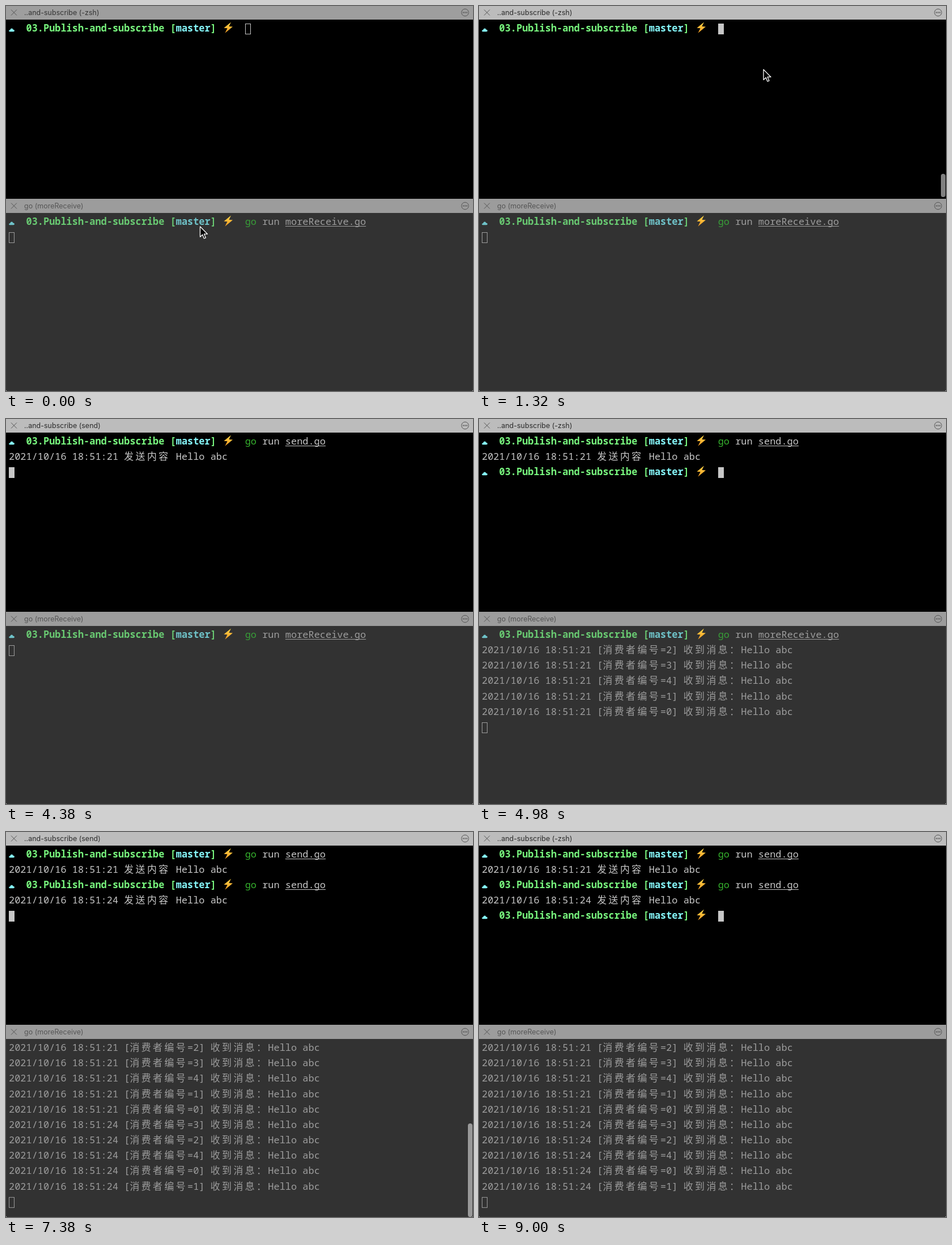
Animation of 824x679 px, one loop 9.24 s. Source, as an HTML page:

```html
<!DOCTYPE html>
<html lang="zh-CN">
<head>
<meta charset="utf-8">
<title>Terminal panes</title>
<style>
  html, body { margin: 0; width: 100%; height: 100%; overflow: hidden; background: #e6e6e6; }
  #stage { position: absolute; left: 0; top: 0; width: 824px; height: 679px; overflow: hidden; background: #000; border-radius: 0 0 3px 3px; }
  .pane { position: absolute; left: 0; width: 824px; overflow: hidden; }
  #top { top: 0; height: 340px; background: #000; --text: #c7c7c7; --green: #78f67e; --cyan: #86f8fb; --cmd: #36b32e; }
  #bottom { top: 340px; height: 339px; background: #323232; --text: #9d9d9d; --green: #69ca72; --cyan: #6fc3c9; --cmd: #389f38; }
  .bar {
    position: absolute; z-index: 1; left: 0; top: 0; width: 824px; height: 24px;
    background: #9e9e9e; color: #343434;
    font: 12.5px/23px Inter, sans-serif;
  }
  .bar.active { background: #bcbcbc; color: #2b2b2b; }
  #bottom .bar { height: 25px; line-height: 26px; background: #9c9c9c; color: #565656; }
  .bar span { position: absolute; left: 32px; white-space: pre; }
  .bar svg { position: absolute; left: 0; top: 0; fill: none; stroke: #555; }
  #bottom .bar svg { top: 1px; }
  .screen {
    position: absolute; left: 5px; top: 24.5px; width: 819px; color: var(--text);
    font: 300 16.945px/27.15px "Noto Sans Mono", "Liberation Mono", monospace;
  }
  #bottom .screen { top: 26px; }
  .row { position: absolute; left: 0; height: 27.15px; white-space: pre; }
  .row b { color: var(--green); font-weight: 700; }
  .row i { color: var(--cyan); font-style: normal; }
  .row em { color: var(--cmd); font-style: normal; }
  .row u { text-underline-offset: 2px; text-decoration-thickness: 1px; text-decoration-skip-ink: none; }
  /* a double cell: 1.2em equals two columns of the monospace grid */
  .wide { display: inline-block; width: 1.2em; line-height: 0; font-family: "Noto Sans CJK SC", "Noto Sans CJK", sans-serif; }
  .row svg { position: absolute; top: 0; overflow: visible; }
  .cloud { left: 0; fill: var(--cyan); }
  .bolt { left: 37ch; }
  .cursor { position: absolute; width: 10.2px; height: 19px; box-sizing: border-box; border: 1px solid var(--text); margin-top: 6px; }
  .cursor.solid { background: var(--text); }
  .scroll { position: absolute; left: 815px; width: 8px; border-radius: 4px; background: rgba(255, 255, 255, .5); }
  #pointer { position: absolute; left: 0; top: 0; overflow: visible; }
</style>
</head>
<body>
<div id="stage">
  <div class="pane" id="top">
    <div class="screen"></div>
    <div class="scroll" style="top:296px;height:41px"></div>
    <div class="bar"><span></span></div>
  </div>
  <div class="pane" id="bottom">
    <div class="screen"></div>
    <div class="scroll" style="top:174px;height:165px"></div>
    <div class="bar"><span>go (moreReceive)</span></div>
  </div>
  <svg id="pointer" width="16" height="24">
    <path d="M0 0V18.2L4.2 14.3 7 21 9.9 19.8 7.1 13.2H13Z" fill="#000" stroke="#fff" stroke-width="1.3" stroke-linejoin="round"/>
  </svg>
</div>
<svg width="0" height="0">
  <linearGradient id="amber" x2="0" y2="1">
    <stop stop-color="#ffd84a"/><stop offset="1" stop-color="#f59a22"/>
  </linearGradient>
</svg>
<script>
const LOOP = 9240, STEP = 60, ROW = 27.15;
const FOCUS = 780;
const first = { recall: 2340, enter: 3720, named: 4200, sent: 4320, done: 4440, idle: 4860 };
const second = { recall: 5280, enter: 6780, named: 7200, sent: 7320, done: 7440, idle: 7860 };

const $ = selector => document.querySelector(selector);
const topScreen = $('#top .screen'), bottomScreen = $('#bottom .screen');
const topBar = $('#top .bar'), topTitle = $('#top .bar span');
const pointer = $('#pointer');
const timed = [];

const widen = text => text.replace(/[\u3000-\u9fff\uff00-\uffef]/g, c => `<span class="wide">${c}</span>`);
const command = file => `<em>go</em> run <u>${file}</u>`;
const prompt = `<svg class="cloud" width="10" height="27"><path d="M1.5 20.3Q0 20 .2 18.6 .6 17.2 2.2 17.2 2.8 14.2 5.2 14.4 7 14.5 7.4 16.6 9.7 16.6 10 18.5 10 20.3 8 20.3Z"/></svg>` +
  `<svg class="bolt" width="20" height="27"><path d="M16 3.6 3.4 13.7 9.6 14.3 5.4 22.7 19 11.5 12.4 10.9Z" fill="url(#amber)"/></svg>` +
  `<b>   03.Publish-and-subscribe [<i>master</i>]     </b>`;

function addRow(screen, row, html, from = 0) {
  const el = document.createElement('div');
  el.className = 'row';
  el.style.top = row * ROW + 'px';
  el.innerHTML = html;
  screen.append(el);
  timed.push({ el, from });
}

function addCommand(row, from, recall) {
  addRow(topScreen, row, prompt, from);
  addRow(topScreen, row, ' '.repeat(41) + command('send.go'), recall);
}

function addCursor(screen) {
  const el = document.createElement('div');
  el.className = 'cursor';
  screen.append(el);
  return (col, row) => {
    el.style.left = col + 'ch';
    el.style.top = row * ROW + 'px';
    return el;
  };
}

const sent = time => widen(`2021/10/16 ${time} 发送内容 Hello abc`);
const received = (time, id) => widen(`2021/10/16 ${time} [消费者编号=${id}] 收到消息：Hello abc`);

addCommand(0, 0, first.recall);
addRow(topScreen, 1, sent('18:51:21'), first.sent);
addCommand(2, first.done, second.recall);
addRow(topScreen, 3, sent('18:51:24'), second.sent);
addRow(topScreen, 4, prompt, second.done);

addRow(bottomScreen, 0, prompt + command('moreReceive.go'));
[...'23410'].forEach((id, i) => addRow(bottomScreen, 1 + i, received('18:51:21', id), first.done));
[...'32401'].forEach((id, i) => addRow(bottomScreen, 6 + i, received('18:51:24', id), second.sent));

for (const bar of document.querySelectorAll('.bar')) {
  bar.insertAdjacentHTML('beforeend', `<svg width="824" height="24">
    <path d="M9 6.5 19 16.5M19 6.5 9 16.5"/>
    <circle cx="810" cy="11.5" r="6.3"/>
    <path d="M806 11.5h1.8m1.3 0h1.8m1.3 0h1.8" stroke-width="1.8"/></svg>`);
}

const moveTop = addCursor(topScreen), moveBottom = addCursor(bottomScreen);
const cursorPath = [
  [0, 41, 0], [first.recall, 55, 0], [first.enter, 0, 1], [first.sent, 0, 2],
  [first.done, 41, 2], [second.recall, 55, 2], [second.enter, 0, 3], [second.sent, 0, 4], [second.done, 41, 4]
];
const [topScroll, bottomScroll] = document.querySelectorAll('.scroll');

const progress = (t, from, to) => Math.min(1, Math.max(0, (t - from) / (to - from)));
const fade = (t, shown, from, to) => t < shown ? 0 : 1 - progress(t, from, to);

function render(t) {
  for (const { el, from } of timed) el.style.visibility = t >= from ? 'visible' : 'hidden';

  const focused = t >= FOCUS;
  topBar.classList.toggle('active', focused);
  const sending = [first, second].some(run => t >= run.named && t < run.idle);
  topTitle.textContent = `..and-subscribe (${sending ? 'send' : '-zsh'})`;

  const [, col, row] = cursorPath.filter(([at]) => at <= t).pop();
  moveTop(col, row).classList.toggle('solid', focused);
  moveBottom(0, t < first.done ? 1 : t < second.sent ? 6 : 11);
  bottomScreen.style.transform = t < second.sent ? 'none' : `translateY(${-ROW}px)`;

  topScroll.style.opacity = fade(t, FOCUS, 1380, 1680);
  bottomScroll.style.opacity = fade(t, second.sent, 7740, 8100);

  const p = progress(t, 60, 900), eased = p * p * (3 - 2 * p);
  pointer.style.transform = `translate(${342.5 + 159.5 * eased}px, ${389 - 277 * eased}px)`;
  pointer.style.visibility = t < first.recall ? 'visible' : 'hidden';
}

const start = performance.now();
function tick() {
  const t = (performance.now() - start) % LOOP;
  render(Math.floor(t / STEP) * STEP);
  requestAnimationFrame(tick);
}
tick();
</script>
</body>
</html>
```
